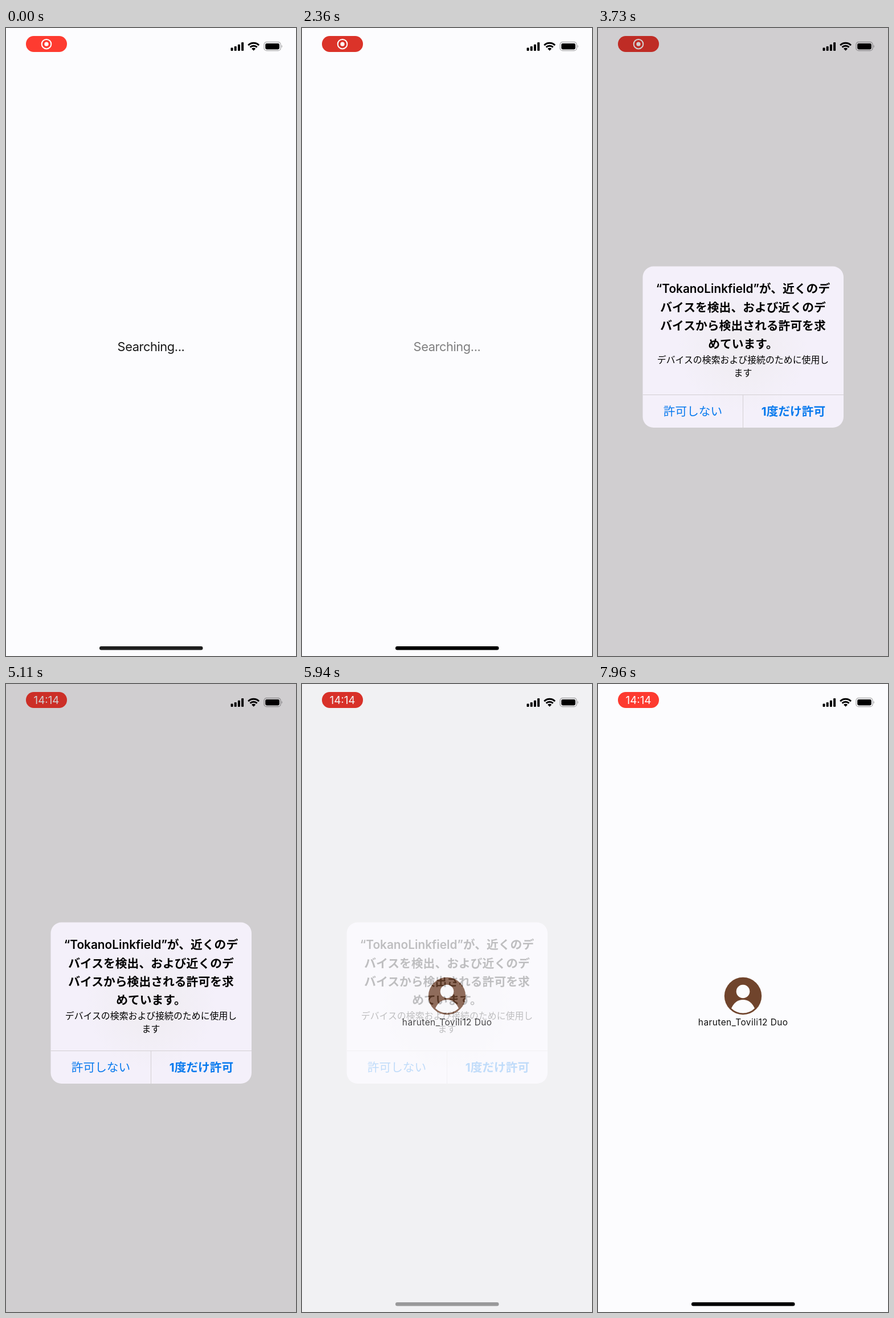
An HTML page for the animation above (8 s loop, 509 by 1100 pixels).

```html
<!DOCTYPE html>
<html lang="ja">
<head>
<meta charset="utf-8">
<title>Searching</title>
<style>
html, body { margin: 0; width: 100%; height: 100%; overflow: hidden; background: #fcfcfe; }
svg { display: block; width: 100vw; height: 100vh; }
text { font-family: Inter, "Noto Sans CJK JP", "Noto Sans CJK", sans-serif; text-anchor: middle; }
.title { font-size: 20.8px; font-weight: 600; }
.title, .allow { font-weight: 700; }
.first { font-weight: 600; }
.body { font-size: 15.9px; font-weight: 350; }
.button { font-size: 20.7px; fill: #087aee; }
.deny { font-weight: 350; }
</style>
</head>
<body>
<svg viewBox="0 0 509 1100" preserveAspectRatio="none">
  <defs>
    <radialGradient id="glass" gradientUnits="userSpaceOnUse" cx="254.5" cy="560" r="115">
      <stop offset="0" stop-color="#efecf0"/>
      <stop offset="1" stop-color="#f4f0fa"/>
    </radialGradient>
    <clipPath id="card"><rect x="78.5" y="417.5" width="352.5" height="282.5" rx="19"/></clipPath>
  </defs>
  <rect width="509" height="1100" fill="#fcfcfe"/>

  <text id="searching" x="254.5" y="566" font-size="21.8" letter-spacing="-.4">Searching...</text>

  <g id="peer">
    <circle cx="254.5" cy="546.5" r="32.7" fill="#70442c"/>
    <g fill="#fcfcfe">
      <circle cx="254.5" cy="538.5" r="11.8"/>
      <path d="M234 568Q241 553 254.5 553Q268 553 275 568A29 29 0 0 1 234 568Z"/>
    </g>
    <text x="254.7" y="598" font-size="15.5" letter-spacing=".4" fill="#111">haruten_Tovili12 Duo</text>
  </g>

  <rect id="pill" x="35" y="14" width="72" height="28" rx="13.7"/>
  <g id="record">
    <circle cx="71" cy="28.2" r="8.3" fill="none" stroke="#fff" stroke-width="2"/>
    <circle cx="71" cy="28.2" r="3.6" fill="#fff"/>
  </g>
  <text id="clock" x="71" y="34.5" font-size="18.8" fill="#fff">14:14</text>

  <g id="status">
    <rect x="394.5" y="34.5" width="4" height="5.5" rx="1"/>
    <rect x="400.7" y="32" width="4" height="8" rx="1"/>
    <rect x="406.9" y="28.7" width="4" height="11.3" rx="1"/>
    <rect x="413.1" y="25" width="4" height="15" rx="1"/>
    <path d="M425.2 30.3A13.2 13.2 0 0 1 444 30.3M428.6 33.8A8.4 8.4 0 0 1 440.6 33.8"
      fill="none" stroke="#000" stroke-width="3"/>
    <path d="M434.6 39.8L431.1 36.3A5 5 0 0 1 438.1 36.3Z"/>
    <rect x="453" y="24.7" width="29" height="15" rx="4.3" fill="none" stroke="#a2a2a4" stroke-width="1.2"/>
    <rect x="455.2" y="27" width="24.6" height="10.5" rx="2.4"/>
    <path d="M483.6 29.6Q486.2 32.2 483.6 34.8Z" fill="#a2a2a4"/>
  </g>

  <g id="overlay">
    <rect width="509" height="1100" fill="#0c0008" opacity=".185"/>
    <g id="alert" clip-path="url(#card)">
      <rect x="78" y="417" width="354" height="284" fill="url(#glass)"/>
      <path d="M78 642.5H432M254.5 642V701" stroke="#d3cfd3" fill="none"/>
      <g class="title">
        <text class="first" x="254.5" y="464">“TokanoLinkfield”<tspan font-weight="700">が、近くのデ</tspan></text>
        <text x="254.5" y="496.5">バイスを検出、および近くのデ</text>
        <text x="254.5" y="529">バイスから検出される許可を求</text>
        <text x="254.5" y="561">めています。</text>
      </g>
      <g class="body">
        <text x="254.5" y="587">デバイスの検索および接続のために使用し</text>
        <text x="254.5" y="610">ます</text>
      </g>
      <g class="button">
        <text class="deny" x="166.5" y="679">許可しない</text>
        <text class="allow" x="343" y="679">1度だけ許可</text>
      </g>
    </g>
  </g>
  <rect id="home" x="164" y="1083" width="181.5" height="6.5" rx="3.2"/>
</svg>
<script>
const LOOP = 8000;
const el = id => document.getElementById(id);
const [searching, peer, pill, record, clock, overlay, alertBox, home] =
  ['searching', 'peer', 'pill', 'record', 'clock', 'overlay', 'alert', 'home'].map(el);
const ramp = (t, from, to) => Math.min(1, Math.max(0, (t - from) / (to - from)));
const easeOut = u => 1 - (1 - u) ** 3;
const wave = (t, peak, period) => Math.cos((t - peak) / period * 2 * Math.PI);
const fade = (node, value) => node.setAttribute('opacity', value.toFixed(3));

function draw(t) {
  const glow = .925 + .075 * wave(t, 80, 1600);
  pill.setAttribute('fill', `rgb(${[255, 59, 48].map(c => Math.round(c * glow))})`);

  const toClock = ramp(t, 4250, 4500);
  fade(record, 1 - toClock);
  fade(clock, toClock);

  // The views swap while the alert covers them.
  const found = t >= 5400;
  fade(searching, found ? 0 : .6 + .4 * wave(t, -225, 2000));
  fade(peer, found ? 1 : 0);

  const shown = easeOut(ramp(t, 3390, 3730));
  fade(overlay, shown * (1 - ramp(t, 5560, 6060)));
  const scale = 1.15 - .15 * shown;
  alertBox.setAttribute('transform',
    `translate(254.5 558.75) scale(${scale.toFixed(4)}) translate(-254.5 -558.75)`);

  fade(home, t < 4500
    ? (.88 + .12 * ramp(t, 0, 200)) * (1 - ramp(t, 3390, 3700))
    : ramp(t, 5540, 6630));
}

const start = performance.now();
function tick() {
  draw((performance.now() - start) % LOOP);
  requestAnimationFrame(tick);
}
draw(0);
requestAnimationFrame(tick);
</script>
</body>
</html>
```
